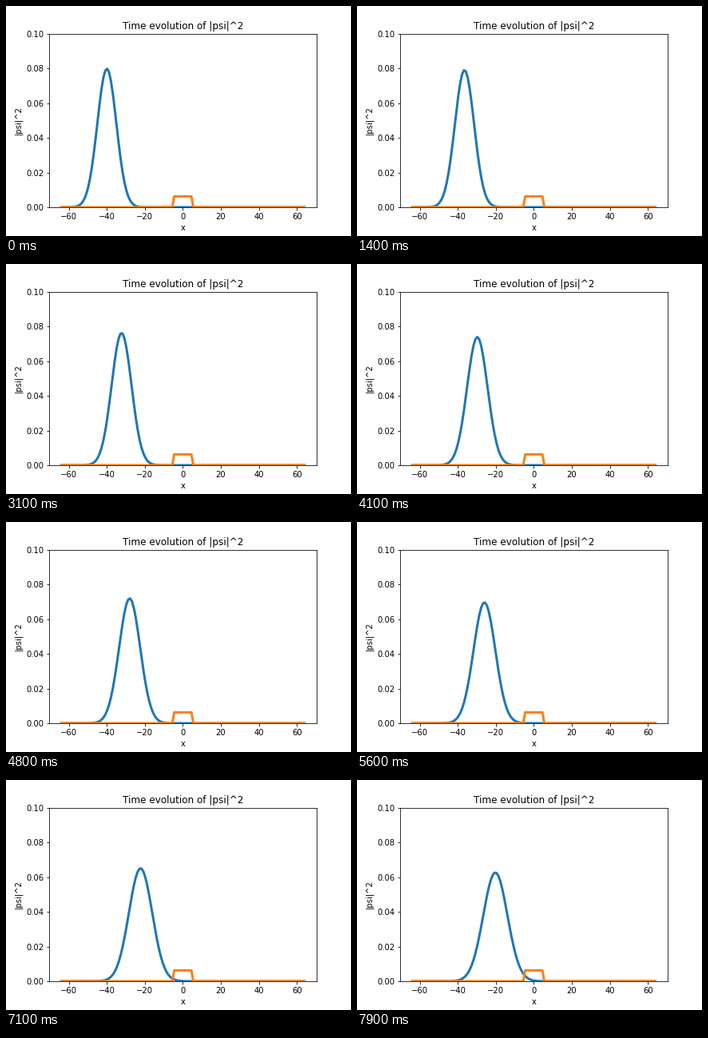
Recreate the animation shown at these times as a matplotlib script. Size 432 by 288 pixels, loop 8 s.

```python
import numpy as np
import matplotlib.pyplot as plt
from matplotlib.animation import FuncAnimation

FRAMES, INTERVAL = 80, 100
X0, SPEED, SIGMA = -40, 0.5, 5   # start, group velocity and initial width
DT = 0.5                         # time step per frame

x = np.linspace(-64, 64, 128)
barrier = np.where(np.abs(x) < 5, 0.00625, 0)


def density(t):
    """Probability density of a freely spreading Gaussian packet."""
    width = SIGMA * np.sqrt(1 + (t / (2 * SIGMA**2))**2)
    z = (x - X0 - SPEED * t) / width
    return np.exp(-z**2 / 2) / (width * np.sqrt(2 * np.pi))


plt.rcParams.update({"font.family": "DejaVu Sans", "font.size": 10})
fig, ax = plt.subplots(figsize=(6, 4), dpi=72)
fig.subplots_adjust(left=0.125, right=0.9, bottom=0.125, top=0.88)

packet, = ax.plot(x, density(0), lw=3)
ax.plot(x, barrier, lw=3)
ax.set_ylim(0, 0.1)
ax.set_title("Time evolution of |psi|^2")
ax.set_xlabel("x")
ax.set_ylabel("|psi|^2")


def update(i):
    packet.set_ydata(density(i * DT))
    return packet,


anim = FuncAnimation(fig, update, frames=FRAMES, interval=INTERVAL,
                     repeat=True, repeat_delay=0)
plt.show()
```
